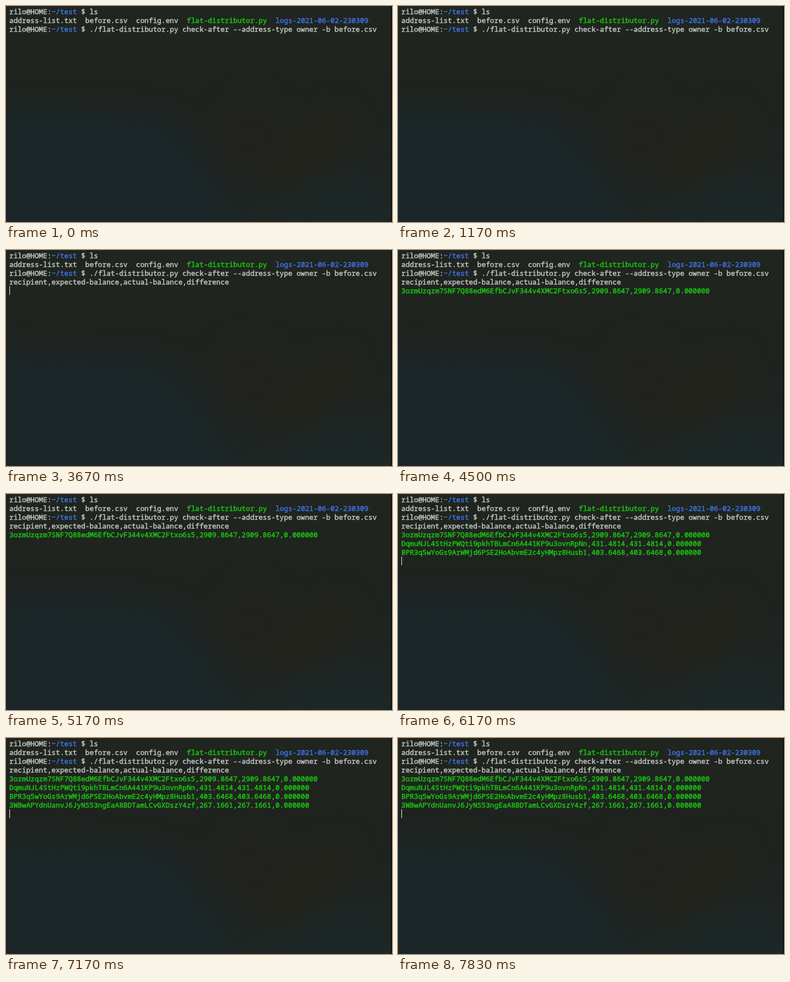
Animation, 700 px wide and 394 px high, one loop 8 s. Source, as an HTML page:

```html
<!DOCTYPE html>
<html lang="en">
<head>
<meta charset="utf-8">
<title>Terminal</title>
<style>
  html, body { margin: 0; width: 100%; height: 100%; overflow: hidden; background: #20241f; }
  svg { display: block; width: 100vw; height: 100vh; }
  text {
    font: 500 12.77px "Noto Sans Mono", "DejaVu Sans Mono", monospace;
    font-variant-ligatures: none;
    white-space: pre;
    fill: currentColor;
    stroke: currentColor;
    stroke-width: .5px;
    color: #c2c6c1;
  }
  .green { color: #1ac812; }
  .blue { color: #3f72e8; }
</style>
</head>
<body>
<svg id="stage" viewBox="0 0 700 394" preserveAspectRatio="none">
  <defs>
    <linearGradient id="base" x1="0" y1="0" x2="0" y2="1">
      <stop offset="0" stop-color="#20251f"/>
      <stop offset=".4" stop-color="#1f231f"/>
      <stop offset=".75" stop-color="#1f2421"/>
      <stop offset="1" stop-color="#1e2624"/>
    </linearGradient>
    <filter id="soft" x="-50%" y="-50%" width="200%" height="200%" color-interpolation-filters="sRGB">
      <feGaussianBlur stdDeviation="22"/>
    </filter>
  </defs>
  <rect width="700" height="394" fill="url(#base)"/>
  <g filter="url(#soft)">
    <path d="M-60 185 L150 188 L285 200 L345 260 L380 330 L450 460 L-60 460Z" fill="#1c2628"/>
    <ellipse cx="445" cy="235" rx="65" ry="70" fill="#21221e"/>
    <path d="M470 320 L520 220 L610 180 L640 240 L570 310 L490 340Z" fill="#23231c"/>
    <path d="M480 385 L540 325 L630 300 L720 340 L720 430 L480 430Z" fill="#1d2726"/>
  </g>
  <rect x="698.6" width="1.4" height="394" fill="#060807"/>
  <g id="rows"></g>
  <rect id="cursor" x="6" width="1.2" height="16" fill="#d2d5d2"/>
</svg>
<script>
const LOOP = 8000, LEFT = 6, CELL = 7.662, PITCH = 16.05;
const rows = document.getElementById("rows");
const cursor = document.getElementById("cursor");

const prompt = [["rilo@HOME:"], ["~/test", "blue"]];
const ok = (key, sum) => [[`${key},${sum},${sum},0.000000`, "green"]];

// Each line: time of appearance, then its coloured runs.
const lines = [
  [0, [...prompt, [" $ ls"]]],
  [0, [["address-list.txt  before.csv  config.env  "], ["flat-distributor.py", "green"],
       ["  "], ["logs-2021-06-02-230309", "blue"]]],
  [0, [...prompt, [" $ ./flat-distributor.py check-after --address-type owner -b before.csv"]]],
  [3500, [["recipient,expected-balance,actual-balance,difference"]]],
  [4330, ok("3ozmUzqzm7SNF7Q88edM6EfbCJvF344v4XMC2Ftxo6s5", "2909.8647")],
  [5330, ok("DqmuNJL4StHzPWQti9pkhTBLmCn6A441KP9u3ovnRpNn", "431.4814")],
  [5830, ok("BPR3q5wYoGs9ArWMjd6PSE2HoAbvmE2c4yHMpz8Husb1", "403.6468")],
  [6670, ok("3WBwAPYdnUanvJ6JyNS53ngEaA8BDTamLCvGXDszY4zf", "267.1661")]
];

// The cursor starts hidden and flips at each of these times.
const flips = [500, 1000, 1500, 2000, 2500, 3000, 3500, 4000,
               4670, 5170, 5830, 6330, 6830, 7330, 7830];

function add(parent, tag, attrs) {
  const node = document.createElementNS("http://www.w3.org/2000/svg", tag);
  for (const name in attrs) node.setAttribute(name, attrs[name]);
  return parent.appendChild(node);
}

const nodes = lines.map(([, runs], row) => {
  const group = add(rows, "g", {});
  let col = 0;
  for (const [words, color = ""] of runs) {
    const pad = words.length - words.trimStart().length;
    add(group, "text", {
      x: LEFT + (col + pad) * CELL, y: 14.5 + row * PITCH, class: color
    }).textContent = words.trim();
    col += words.length;
  }
  return group;
});

function draw(t) {
  const shown = lines.filter(([start]) => t >= start).length;
  nodes.forEach((node, i) => node.setAttribute("visibility", i < shown ? "visible" : "hidden"));

  const waiting = shown === 3;
  const row = waiting ? 2 : shown;
  const on = flips.filter(time => t >= time).length % 2;
  cursor.setAttribute("x", waiting ? LEFT + 87 * CELL : LEFT);
  cursor.setAttribute("y", 1.7 + row * PITCH);
  cursor.setAttribute("visibility", on ? "visible" : "hidden");
}

function tick() {
  draw(performance.now() % LOOP);
  requestAnimationFrame(tick);
}
tick();
</script>
</body>
</html>
```
